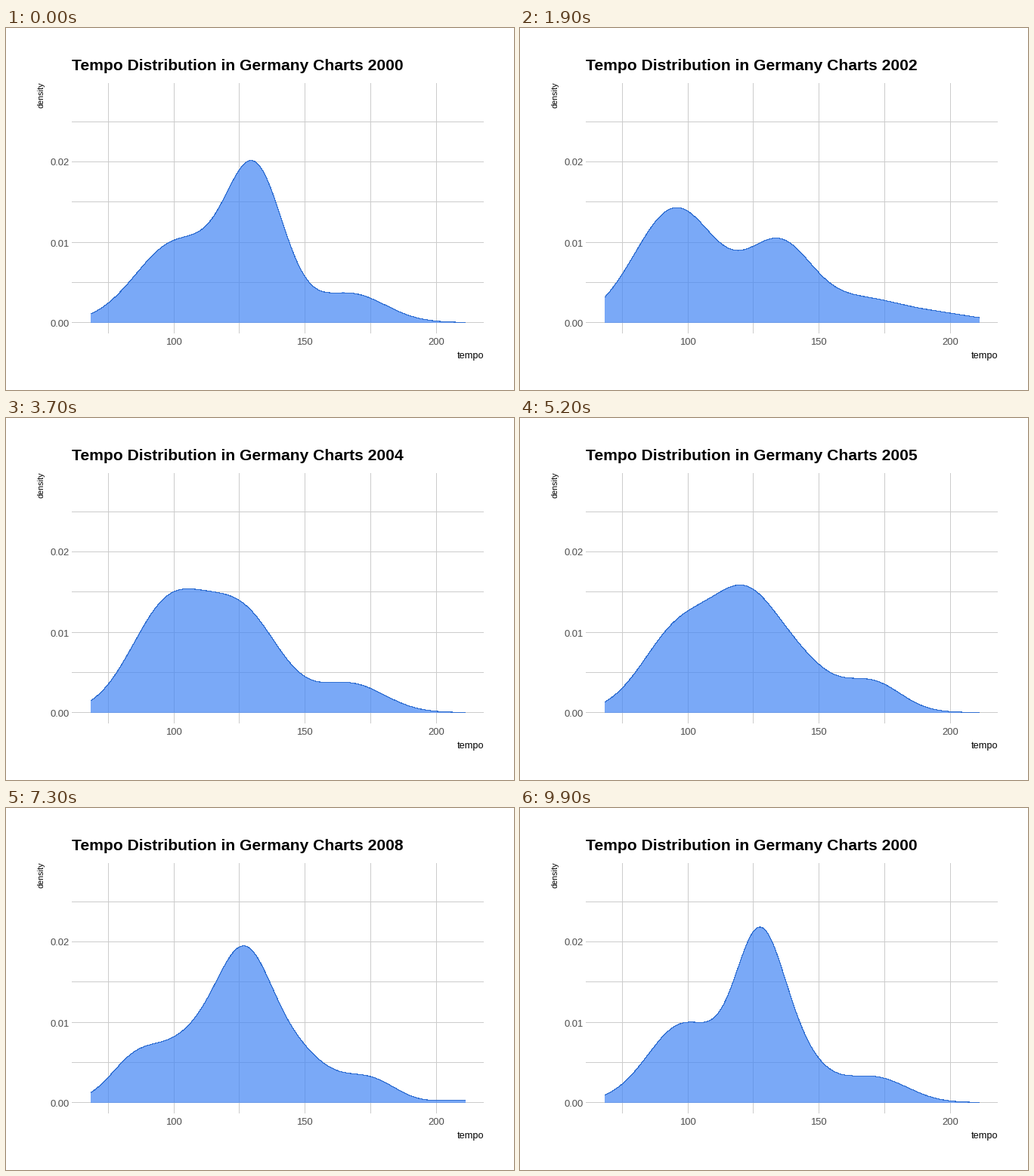
A matplotlib script that plays this animation: 672x480 px, repeating every 10 s.

```python
import numpy as np
import matplotlib.pyplot as plt
from matplotlib.animation import FuncAnimation
from matplotlib.patches import Polygon

W, H, DPI = 672, 480, 100
PX = 72 / DPI                      # points per pixel
FRAMES, INTERVAL = 100, 100
LEFT, RIGHT, TOP, BOTTOM = 87, 632, 73, 405
FONT = "Liberation Sans"
FIRST, YEARS = 2000, 11

# Humps of each density curve: (tempo, spread, height in thousandths).
# Years left out lie evenly between their neighbours.
HUMPS = {
    2000: [(101, 15.5, 9.9), (130.8, 11, 18.4), (167, 13.5, 3.6)],
    2001: [(96.2, 15.5, 13.8), (134.5, 12, 12.4), (168, 12, 2.9), (197, 11, 0.5)],
    2003: [(94.6, 15.6, 14.6), (137, 15.2, 7.1), (180, 22, 2.7)],
    2004: [(97.7, 14.1, 12.8), (126, 14.5, 12), (167.5, 13, 3.5)],
    2007: [(96.5, 14.5, 7.1), (121.3, 11.2, 14.7), (143.5, 11.5, 8.4),
           (171.5, 9.9, 4.3)],
    2009: [(84, 9, 6), (106.5, 12.5, 6.4), (128.6, 9.6, 20.3),
           (150, 11.5, 4.5), (179, 9, 2), (209, 8, 0.6)],
    2010: [(95, 11, 10.1), (125.8, 8, 27.9), (149, 8, 4.5), (177, 10.5, 3)],
}


def px(tempo):
    return 222 + 3.47 * (tempo - 100)


def py(thousandths):
    return 390.5 - 10.65 * thousandths


tempo = np.linspace(68.4, 211.2, 512)
xs = px(tempo)


def density(year):
    if year in HUMPS:
        return sum(h * np.exp(-((tempo - c) / s) ** 2 / 2) for c, s, h in HUMPS[year])
    before = max(y for y in HUMPS if y < year)
    after = min(y for y in HUMPS if y > year)
    w = (year - before) / (after - before)
    return (1 - w) * density(before) + w * density(after)


curves = [density(FIRST + i) for i in range(YEARS)]

fig = plt.figure(figsize=(W / DPI, H / DPI), dpi=DPI, facecolor="white")
ax = fig.add_axes([0, 0, 1, 1])
ax.set(xlim=(0, W), ylim=(H, 0))
ax.axis("off")


def rule(x, y):
    ax.plot(x, y, color="#cccccc", lw=PX, snap=False,
            solid_capstyle="butt", zorder=1)


def label(x, y, text, size, **style):
    return ax.text(x, y, text, fontsize=size * PX, family=FONT,
                   **{"color": "black", "va": "baseline", **style})


for d in range(0, 26, 5):
    y = np.floor(py(d)) + 0.5
    rule([LEFT, RIGHT], [y, y])
    if d % 10 == 0:
        label(83.5, y + 5, f"{d / 1000:.2f}", 13, ha="right", color="#4d4d4d")
for t in range(75, 201, 25):
    x = np.floor(px(t)) + 0.5
    rule([x, x], [TOP, BOTTOM])
    if t % 50 == 0:
        label(x - 0.5, 420, str(t), 13, ha="center", color="#4d4d4d")

label(RIGHT, 438, "tempo", 12.7, ha="right")
label(50, 72, "density", 10.8, ha="right", rotation=90, rotation_mode="anchor")
title = label(LEFT, 56, "", 21.1, ha="left", weight="bold")

# Without antialiasing every touched pixel is filled, so a hairline is 1 px wide.
area = Polygon([(0, 0), (1, 0), (1, 1)], facecolor="#4285f4", alpha=0.7,
               lw=0, antialiased=False, zorder=2)
ax.add_patch(area)
outline, = ax.plot([], [], color="#3270d2", lw=0.05 * PX, antialiased=False,
                   solid_capstyle="butt", zorder=3)


def state(frame):
    """Index of the current year and progress towards the next one."""
    k = t = 0
    for i in range(YEARS):
        start = 7 + 9 * i - max(0, 2 - i)      # the first two changes take longer
        steps = 5 if i < 2 else 4
        if frame >= start:
            k, t = i, min((frame - start + 1) / steps, 1)
    return k, t


def update(frame):
    k, t = state(frame)
    following = (k + 1) % YEARS
    ys = py((1 - t) * curves[k] + t * curves[following])
    area.set_xy(np.vstack([(xs[0], py(0)), np.column_stack([xs, ys]), (xs[-1], py(0))]))
    outline.set_data(xs, ys)
    year = FIRST + (following if t >= 0.5 else k)
    title.set_text(f"Tempo Distribution in Germany Charts {year}")
    return area, outline, title


anim = FuncAnimation(fig, update, frames=FRAMES, interval=INTERVAL,
                     repeat=True, repeat_delay=0, blit=False)
plt.show()
```
